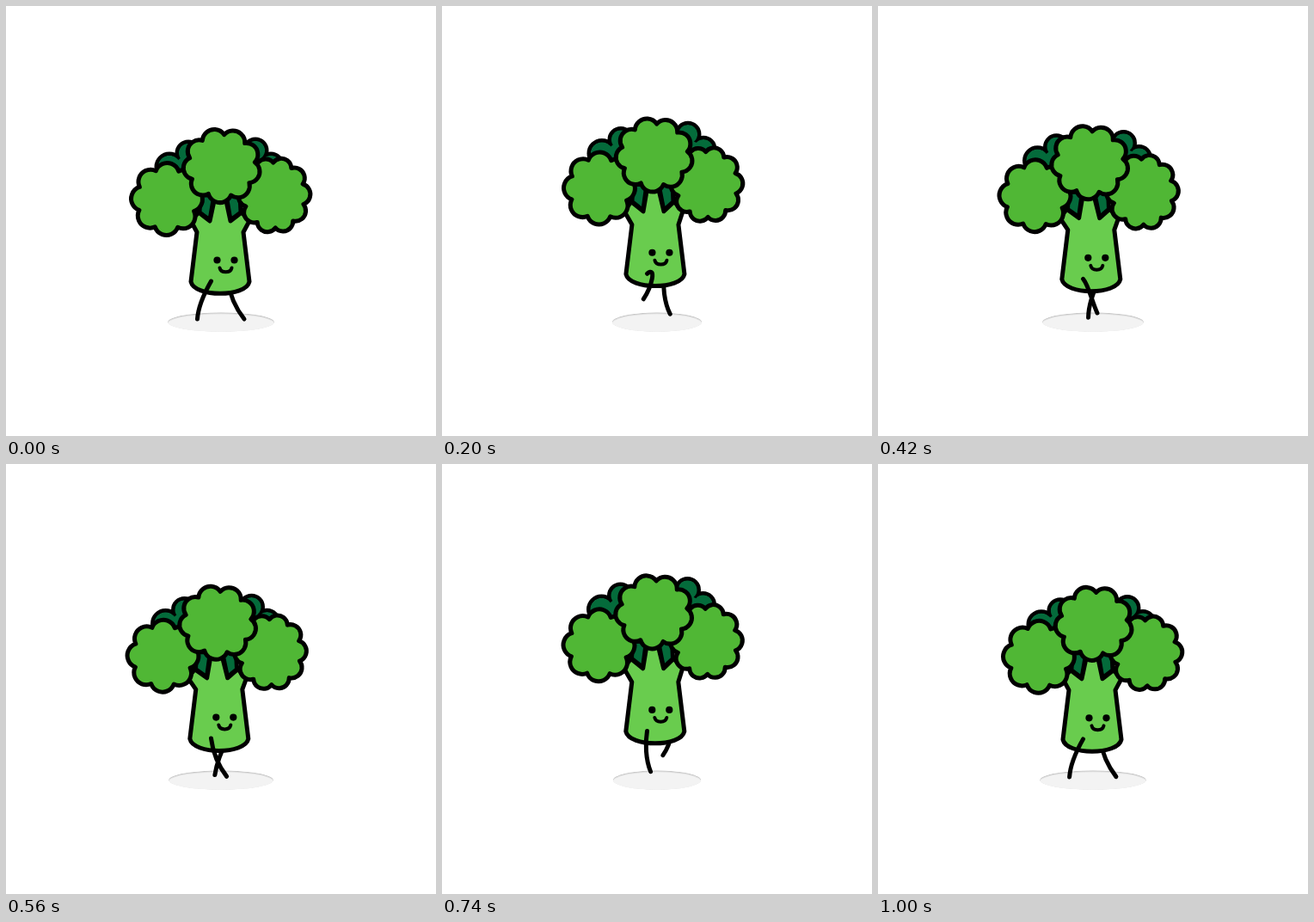
These frames come from a looping animation (500x500 px, 1020 ms). An HTML page with a canvas:

```html
<!DOCTYPE html>
<html lang="en">
<head>
<meta charset="utf-8">
<title>Walking broccoli</title>
<style>
html, body { margin: 0; width: 100%; height: 100%; overflow: hidden; background: #fff; }
canvas { display: block; width: 500px; height: 500px; }
</style>
</head>
<body>
<canvas id="stage" width="500" height="500"></canvas>
<script>
const LOOP = 1020, STEP = LOOP / 2;
const LEAF = '#50b735', STALK = '#69cc4e', DARK = '#046b3b';
const ctx = document.getElementById('stage').getContext('2d');

const wave = p => (1 - Math.cos(2 * Math.PI * p)) / 2;

function ink(fill) {
  if (fill) {
    ctx.fillStyle = fill;
    ctx.fill();
  }
  ctx.stroke();
}

function shifted(dx, dy, draw) {
  ctx.save();
  ctx.translate(dx, dy);
  draw();
  ctx.restore();
}

function disc(x, y, r) {
  ctx.beginPath();
  ctx.arc(x, y, r, 0, 7);
}

function polygon(points) {
  ctx.beginPath();
  points.forEach(p => ctx.lineTo(...p));
}

// An ellipse edged with n equal round bumps, the first one centred at angle `turn` (degrees).
function floret(x, y, rx, ry, n, turn) {
  const notch = i => {
    const a = turn * Math.PI / 180 + (i - 0.5) * 2 * Math.PI / n;
    return [x + rx * Math.cos(a), y + ry * Math.sin(a)];
  };
  ctx.beginPath();
  for (let i = 0; i < n; i++) {
    const [x1, y1] = notch(i), [x2, y2] = notch(i + 1);
    const cx = (x1 + x2) / 2 - (y2 - y1) * 0.176;
    const cy = (y1 + y2) / 2 + (x2 - x1) * 0.176;
    ctx.arc(cx, cy, Math.hypot(x1 - cx, y1 - cy),
      Math.atan2(y1 - cy, x1 - cx), Math.atan2(y2 - cy, x2 - cx));
  }
  ctx.closePath();
  ink(LEAF);
}

// Discs merged into one outlined shape.
function cluster(...discs) {
  for (const d of discs) { disc(...d); ink(); }
  ctx.fillStyle = DARK;
  for (const [x, y, r] of discs) { disc(x, y, r - 2); ctx.fill(); }
}

// The foot swings forward through the air in the first half of the phase, then slides back.
function leg(hipX, hipY, phase) {
  const p = phase % 1, swing = Math.cos(2 * Math.PI * p), bounce = wave(2 * p);
  const lift = p < 0.5 ? bounce : 0;
  const footX = hipX + 1.5 - 17.5 * swing;
  const footY = 364 - 6.5 * bounce - 19.5 * lift;
  ctx.beginPath();
  ctx.moveTo(hipX, hipY);
  ctx.bezierCurveTo(
    hipX - 3 - 5 * swing + 18 * lift, hipY + 14 - 26 * lift,
    footX - 5 + 6 * swing + 14 * lift, footY - 14,
    footX, footY);
  ink();
}

function shadow(rx) {
  ctx.save();
  ctx.beginPath();
  ctx.ellipse(250, 367.5, rx, 11.2, 0, 0, 7);
  ctx.clip();
  ['#c6c6c6', '#e0e0e0', '#f3f3f3'].forEach((tone, i) => {
    ctx.beginPath();
    ctx.ellipse(250, 367.5 + i, rx, 11.2, 0, 0, 7);
    ctx.fillStyle = tone;
    ctx.fill();
  });
  ctx.fillRect(250 - rx, 368, 2 * rx, 12);
  ctx.restore();
}

// The lower stalk follows the body; its branches follow the florets.
function stalk(bodyX, bodyY, leafX, leafY) {
  const stretch = ([x, y]) => {
    const k = Math.max(0, Math.min(1, (263 - y) / 20));
    return [249 + x + bodyX + (leafX - bodyX) * k, y + bodyY + (leafY - bodyY) * k];
  };
  const mirror = ([x, y]) => [-x, y];
  const branch = [[-23, 220], [-7, 220], [-12, 249], [-24, 240]];
  const half = [[-34, 320.5], [-27, 263], [-34, 250], [-25, 240], [-12, 250], [-6, 222]];

  for (const side of [branch, branch.map(mirror)]) {
    polygon(side.map(stretch));
    ctx.closePath();
    ink(DARK);
  }
  polygon([...half, ...half.map(mirror).reverse()].map(stretch));
  ctx.bezierCurveTo(...stretch([30, 339]), ...stretch([-30, 339]), ...stretch(half[0]));
  ctx.closePath();
  ink(STALK);
}

function face() {
  ctx.fillStyle = '#000';
  for (const x of [245.5, 265.5]) {
    disc(x, 295.5, 4.1);
    ctx.fill();
  }
  ctx.lineWidth = 4;
  ctx.beginPath();
  ctx.moveTo(248.5, 304.5);
  ctx.bezierCurveTo(250, 311, 261, 311, 262.5, 304.5);
  ink();
}

function draw(t) {
  const p = t % STEP, bounce = wave(p / STEP);
  // The florets behind rise slower than they fall.
  const peak = 292;
  const lag = wave(p < peak ? p / peak / 2 : (1 + (p - peak) / (STEP - peak)) / 2);
  const sway = wave(Math.min(t, LOOP - t, STEP / 2) / STEP);
  const bodyX = -1.2 * sway, bodyY = -9.8 * bounce;
  const leafX = -4.5 * sway, leafY = -14 * bounce;

  ctx.fillStyle = '#fff';
  ctx.fillRect(0, 0, 500, 500);
  ctx.lineWidth = 5;
  ctx.lineCap = ctx.lineJoin = 'round';
  ctx.strokeStyle = '#000';

  shadow(62 - 11 * bounce);
  leg(258, 320 + bodyY, t / LOOP + 0.5);

  shifted(leafX, -20 * lag, () => cluster([190, 187, 15], [212, 171, 13], [212, 190, 18]));
  shifted(leafX, -24 * lag, () => cluster([290, 168, 13], [308, 185, 13], [293, 192, 18]));
  stalk(bodyX, bodyY, leafX, leafY);
  shifted(leafX, leafY, () => {
    floret(187, 224.5, 34.5, 35.3, 8, -89);
    floret(312, 220, 35.3, 38, 10, -74);
    floret(251, 185.5, 38.5, 36, 9, -106);
  });

  leg(238.5, 320 + bodyY, t / LOOP);
  shifted(bodyX, bodyY, face);
}

const start = performance.now();
function tick() {
  draw((performance.now() - start) % LOOP);
  requestAnimationFrame(tick);
}
tick();
</script>
</body>
</html>
```
